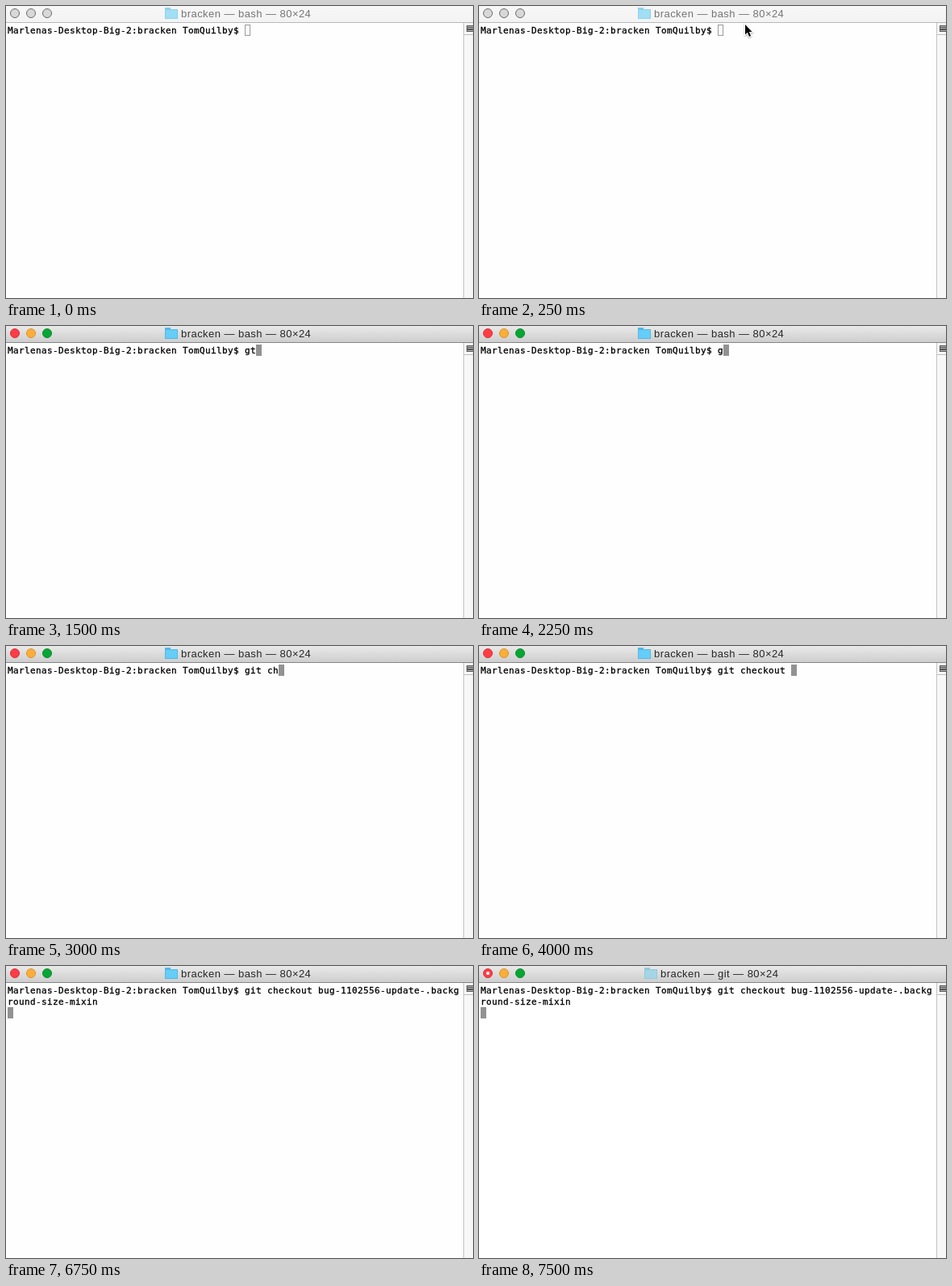
These frames come from a looping animation (579x362 px, 8 s). An HTML page with a canvas:

```html
<!DOCTYPE html>
<html lang="en">
<head>
<meta charset="utf-8">
<title>Terminal</title>
<style>
html, body { margin: 0; width: 579px; height: 362px; overflow: hidden; }
canvas { display: block; }
</style>
</head>
<body>
<canvas id="stage" width="579" height="362"></canvas>
<script>
const ctx = document.getElementById('stage').getContext('2d');
const LOOP = 8000, COLS = 80, CELL_W = 7, CELL_H = 14;
const PROMPT = 'Marlenas-Desktop-Big-2:bracken TomQuilby$ ';
const COMMAND = 'git checkout bug-1102556-update-.background-size-mixin';

// [start time, typed text]
const TYPING = [
  [0, ''], [1500, 'gt'], [2250, 'g'], [2750, 'git '], [3000, 'git ch'],
  [3250, 'git chec'], [3500, 'git check'], [3750, 'git checkou'],
  [4000, 'git checkout '], [5500, COMMAND]
];

function rect(x, y, w, h, color) {
  ctx.fillStyle = color;
  ctx.fillRect(x, y, w, h);
}

function frame(x, y, w, h, color) {
  ctx.strokeStyle = color;
  ctx.lineWidth = 1;
  ctx.strokeRect(x + .5, y + .5, w - 1, h - 1);
}

function disc(x, y, r, fill, stroke) {
  ctx.beginPath();
  ctx.arc(x, y, r, 0, Math.PI * 2);
  ctx.fillStyle = fill;
  ctx.fill();
  if (!stroke) return;
  ctx.strokeStyle = stroke;
  ctx.lineWidth = 1;
  ctx.stroke();
}

function folder(x, front, back) {
  rect(x, 2, 7, 2, back);
  rect(x, 4, 16, 12, front);
  frame(x, 4, 16, 12, back);
}

function titleBar(t) {
  const active = t >= 500, running = t >= 7000;
  const shade = ctx.createLinearGradient(0, 0, 0, 20);
  shade.addColorStop(0, active ? '#e9e9e9' : '#f7f7f7');
  shade.addColorStop(1, active ? '#cecece' : '#f3f3f3');
  rect(0, 0, 579, 20, shade);
  rect(0, 20, 579, 1, active ? '#858585' : '#b8b8b8');

  const lights = [['#fc3d46', '#d92f38'], ['#fbae3a', '#d9922c'], ['#06a635', '#078c2d']];
  lights.forEach(([fill, edge], i) =>
    disc(11 + 20 * i, 9, 5.5, active ? fill : '#d8d8d8', active ? edge : '#6c6c6c'));
  if (running) disc(11, 9, 2, '#fff');

  const x = running ? 205 : 197;
  if (!active) folder(x, '#a0dff5', '#8fd2ea');
  else if (t < 7500) folder(x, '#66cdf8', '#50b8e4');
  else folder(x, '#a3d5e7', '#93c8dc');

  ctx.font = '13px "Liberation Sans", Arial, sans-serif';
  ctx.letterSpacing = '0.45px';
  ctx.fillStyle = active ? '#262626' : '#757575';
  ctx.fillText(`bracken — ${running ? 'git' : 'bash'} — 80×24`, x + 20, 14);
  ctx.letterSpacing = '0px';
}

function scrollBar() {
  rect(567, 21, 1, 341, '#c3c3c3');
  rect(568, 21, 11, 341, '#f7f7f7');
  rect(568, 35, 11, 1, '#bdbdbd');
  rect(571, 24, 8, 8, '#b4b4b4');
  frame(571, 24, 9, 8, '#555');
  rect(572, 26, 7, 1, '#555');
  rect(572, 28, 7, 2, '#555');
}

function terminal(t) {
  const typed = TYPING.filter(([start]) => t >= start).pop()[1];
  const text = PROMPT + typed;
  ctx.font = '11px "DejaVu Sans Mono", monospace';
  ctx.fillStyle = ctx.strokeStyle = '#000';
  ctx.lineWidth = .3;
  [...text].forEach((ch, i) => {
    const x = 2 + i % COLS * CELL_W, y = 34 + Math.floor(i / COLS) * CELL_H;
    ctx.fillText(ch, x, y);
    ctx.strokeText(ch, x, y);
  });

  const cell = t < 6750 ? text.length : 2 * COLS;
  const x = 2 + cell % COLS * CELL_W, y = 23 + Math.floor(cell / COLS) * CELL_H;
  if (t < 500) frame(x, y, CELL_W, CELL_H, '#999');
  else rect(x, y, CELL_W, CELL_H, '#929292');
}

function pointer(x, y) {
  ctx.save();
  ctx.translate(x, y);
  const arrow = new Path2D('M0 0V12.4L2.8 9.8 5 15 7 14.1 4.9 9H8.6Z');
  ctx.shadowColor = 'rgba(0,0,0,.35)';
  ctx.shadowBlur = 2;
  ctx.shadowOffsetY = 1;
  ctx.strokeStyle = '#fff';
  ctx.lineWidth = 2;
  ctx.stroke(arrow);
  ctx.shadowColor = 'transparent';
  ctx.fillStyle = '#000';
  ctx.fill(arrow);
  ctx.restore();
}

function draw(now) {
  const t = now % LOOP;
  rect(0, 0, 579, 362, t < 7500 ? '#fefefe' : '#fff');
  titleBar(t);
  scrollBar();
  terminal(t);
  if (t >= 250 && t < 500) pointer(330, 23);
  else if (t >= 500 && t < 750) pointer(326, 25);
  requestAnimationFrame(draw);
}

draw(0);
</script>
</body>
</html>
```
